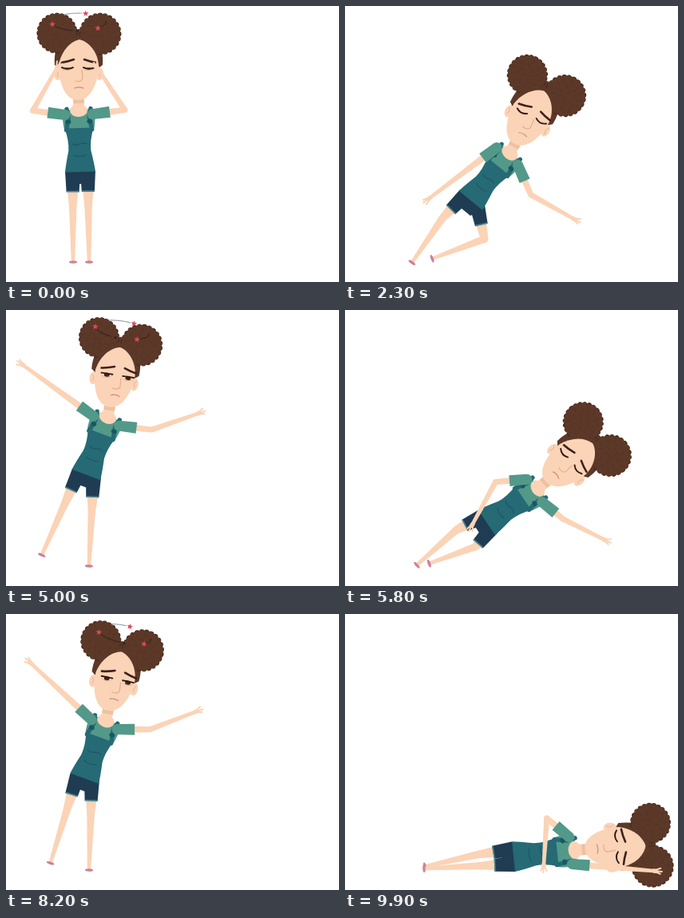
These frames come from a looping animation (417 by 346 pixels, 10 s). An HTML page with a canvas:

```html
<!DOCTYPE html>
<html lang="en">
<head>
<meta charset="utf-8">
<title>Dizzy spell</title>
<style>
html, body { margin: 0; width: 100%; height: 100%; overflow: hidden; background: #fff; }
canvas { display: block; }
</style>
</head>
<body>
<canvas id="stage" width="417" height="346"></canvas>
<script>
const ctx = document.getElementById('stage').getContext('2d');
const LOOP = 10000, CYCLE = LOOP / 3, STEP = 100, TAU = Math.PI * 2, DEG = TAU / 360;
const LANDED = 2620;
const SKIN = '#fbd3b6', SHADE = '#e3ae90', HAIR = '#5b3828', HAIR_DARK = '#4b2d20',
  SHIRT = '#52998a', DENIM = '#256a74', DENIM_DARK = '#1b5661', SHORTS = '#1f3c53',
  CUFF = '#4f8793', SHOE = '#cf7f98', STAR = '#e0485a';

// Key poses: joints in stage pixels, angles in degrees
const hold = { hip: [93, 207], lean: [-1.5], tilt: [0], handL: [63, 79], handR: [116, 80],
  footL: [84, 319], footR: [104, 319] };
const swoon = { ...hold, lean: [15], tilt: [7], handL: [93, 82], handR: [163, 72] };
const reel = { ...hold, hip: [97, 205], lean: [20], tilt: [14], handL: [40, 58], handR: [234, 118],
  footL: [64, 314] };
const teeter = { ...reel, hip: [103, 206], lean: [21], tilt: [6], handL: [12, 78], handR: [242, 138],
  footL: [34, 300] };
const tumble = { hip: [158, 243], lean: [39.5], tilt: [28], handL: [107, 240], handR: [285, 266],
  footL: [85, 320], footR: [111, 316] };
const rest = { hip: [212, 304], lean: [84], tilt: [86], handL: [249, 313], handR: [386, 322],
  footL: [102, 316], footR: [101, 319] };

const smooth = u => u * u * (3 - 2 * u);
const drop = u => u ** 1.5;
const moves = [[300, 670, swoon, smooth], [1080, 1350, reel, smooth], [1350, 1900, teeter, smooth],
  [2130, 2300, tumble, drop], [2300, LANDED, rest, drop]];

const clamp = v => Math.min(1, Math.max(0, v));
const ramp = (t, from, to) => clamp((t - from) / (to - from));
const mix = (a, b, u) => a + (b - a) * u;

const turn = ([x, y], a) => [x * Math.cos(a) - y * Math.sin(a), x * Math.sin(a) + y * Math.cos(a)];
const add = (p, q) => [p[0] + q[0], p[1] + q[1]];
const dir = (p, q) => Math.atan2(q[1] - p[1], q[0] - p[0]);
const dist = (p, q) => Math.hypot(q[0] - p[0], q[1] - p[1]);
const toward = (p, q, d) => add(p, turn([d, 0], dir(p, q)));

function poseAt(t) {
  let pose = hold;
  for (const [from, to, next, ease] of moves) {
    const u = ease(ramp(t, from, to)), blend = {};
    for (const key in next) blend[key] = next[key].map((v, i) => mix(pose[key][i], v, u));
    pose = blend;
  }
  // Sway on the feet, then settle after landing
  const sway = t < 1333 ? -6 * Math.sin(t / 1333 * TAU) : 0;
  const after = Math.max(0, t - LANDED);
  const wobble = 6 * Math.exp(-after / 90) * Math.sin(after / 45);
  pose.lean = (pose.lean[0] + sway * .75 + wobble) * DEG;
  pose.tilt = (pose.tilt[0] + sway * .3 + wobble) * DEG;
  for (const hand of [pose.handL, pose.handR]) hand[0] += sway;
  return pose;
}

// Middle joint of a two-bone limb; side sets how far and which way it bends
function joint(p, q, upper, lower, side) {
  const d = dist(p, q), along = (upper * upper - lower * lower + d * d) / (2 * d);
  const out = Math.sqrt(Math.max(0, upper * upper - along * along));
  return add(p, turn([along, -out * side], dir(p, q)));
}

function shape(d, fill, stroke, width = 1) {
  const path = new Path2D(d);
  if (fill) { ctx.fillStyle = fill; ctx.fill(path); }
  if (stroke) { ctx.strokeStyle = stroke; ctx.lineWidth = width; ctx.stroke(path); }
}

function oval(x, y, rx, ry, fill) {
  ctx.fillStyle = fill;
  ctx.beginPath();
  ctx.ellipse(x, y, rx, ry, 0, 0, TAU);
  ctx.fill();
}

function limb(p, q, w1, w2, fill, roundEnd = true) {
  const a = dir(p, q);
  const pts = [add(p, turn([0, -w1 / 2], a)), add(q, turn([0, -w2 / 2], a)),
    add(q, turn([0, w2 / 2], a)), add(p, turn([0, w1 / 2], a))];
  shape('M' + pts.join('L') + 'Z', fill);
  if (roundEnd) oval(...q, w2 / 2, w2 / 2, fill);
}

function at([x, y], a, draw) {
  ctx.save();
  ctx.translate(x, y);
  ctx.rotate(a);
  draw();
  ctx.restore();
}

function leg(hip, knee, foot) {
  const hem = toward(hip, knee, 26);
  limb(hem, knee, 13, 9.5, SKIN);
  limb(knee, foot, 9.5, 4.5, SKIN);
  at(foot, dir(knee, foot) - TAU / 4, () => oval(0, 2, 5, 1.7, SHOE));
}

function shortLeg(hip, knee) {
  const hem = toward(hip, knee, 26);
  limb(hip, hem, 19, 16, SHORTS, false);
  limb(toward(hip, knee, 24.5), hem, 16, 16, CUFF, false);
}

function torso(h) {
  shape('M-8,0L-19,3Q-22,12 -18,28H18Q22,12 19,3L8,0Z', SHIRT);
  oval(0, 2, 11, 8, SKIN);
  shape(`M-18,24H18Q13,40 14,52Q18,${h - 8} 19,${h + 1}H-19Q-18,${h - 8} -14,52Q-13,40 -18,24Z`, DENIM);
  for (const s of [-1, 1]) {
    shape(`M${s * 15},0L${s * 13},10L${s * 16},26`, null, DENIM, 5.5);
    oval(s * 13.5, 16, 3.5, 2.6, DENIM_DARK);
  }
  shape('M-9,44Q-4,46 0,44T9,44M-8,58Q0,61 8,58', null, DENIM_DARK);
}

function bun(x, y, r) {
  for (let i = 0; i < 24; i++) {
    const [dx, dy] = turn([r - 3, 0], i / 24 * TAU);
    oval(x + dx, y + dy, 3.6, 3.6, i % 2 ? HAIR : HAIR_DARK);
  }
  oval(x, y, r - 1, r - 1, HAIR);
  ctx.globalAlpha = .25;
  ctx.strokeStyle = HAIR_DARK;
  ctx.lineWidth = 1;
  for (let i = 0; i < 22; i++) {
    const a = i * 2.4, [dx, dy] = turn([Math.sqrt(i / 22) * (r - 4), 0], a);
    ctx.beginPath();
    ctx.arc(x + dx, y + dy, 2.8, a, a + 2.6);
    ctx.stroke();
  }
  ctx.globalAlpha = 1;
}

function eye(x, y, open) {
  at([x, y], 0, () => {
    if (open > .1) {
      shape(`M-7,-1H7Q0,${9 * open} -7,-1Z`, '#fff');
      oval(0, .5, 3.6, 3.2 * open, '#4a2417');
      shape(`M-6,2Q0,${2 + 5 * open} 6,1`, null, SHADE, .8);
    }
    shape(`M-7,-1Q0,${4 - 6 * open} 7,-1`, null, '#2e1a15', 1.9);
  });
}

function star(x, y) {
  const pts = Array.from({ length: 10 }, (_, i) => add([x, y], turn([0, i % 2 ? -1.7 : -4], i * TAU / 10)));
  shape('M' + pts.join('L') + 'Z', STAR);
}

// Stars circling the head; only the near or far half is drawn
function halo(t, near) {
  const spot = a => [34 * Math.cos(a), -60 + 11 * Math.sin(a)];
  const visible = a => Math.sin(a) > 0 === near;
  for (let i = 0; i < 3; i++) {
    const a = (45 + 120 * i - .787 * t) * DEG;
    for (let k = 8; k < 62; k += 6) {
      const b = a - k * DEG;
      if (visible(b)) shape(`M${spot(b)}L${spot(b - 6 * DEG)}`, null, near ? '#34221f' : '#8f989c', .9);
    }
    const dot = a - 72 * DEG;
    if (visible(dot)) oval(...spot(dot), 1.5, 1.5, '#2b2326');
    if (visible(a)) star(...spot(a));
  }
}

function features(open) {
  shape('M-22,-9Q-14,-10 -6,-13M7,-13Q15,-10 22,-9', null, '#3d211a', 2.6);
  eye(-14, -2, open);
  eye(13, -2, open);
  shape('M4,0L5,11Q2,16 -4,14', null, SHADE, 1.2);
  shape('M-5,23Q0,20.5 6,23', null, '#c88f7c', 1.2);
}

function head(t) {
  const dizzy = t < 2150;
  const blink = clamp(1.7 - Math.abs(t - 690) / 100);
  const open = dizzy ? Math.min(.85, .35 + t / 60) * (1 - blink) : 0;
  const look = 4 * ramp(t, 1080, 1350) * (1 - ramp(t, 2130, LANDED));
  if (dizzy) halo(t, false);
  shape('M-30,-6C-32,-30 -20,-49 0,-51C20,-49 32,-30 30,-6L22,0H-22Z', HAIR);
  bun(-27, -46, 25);
  bun(27, -45, 26);
  for (const s of [-1, 1]) {
    oval(s * 26, 5, 5, 8, SKIN);
    shape(`M${s * 28},1Q${s * 24},4 ${s * 27},9`, null, SHADE, .8);
  }
  shape('M1,-38C-12,-35 -22,-22 -25,-6C-25,14 -18,38 -1,38C16,38 25,14 25,-6C24,-21 14,-35 1,-38Z', SKIN);
  at([look, 0], 0, () => features(open));
  if (dizzy) halo(t, true);
}

function arm(shoulder, wrist, side) {
  const elbow = joint(shoulder, wrist, 41, 60, side);
  limb(shoulder, elbow, 9, 7, SKIN);
  limb(elbow, wrist, 7, 4.5, SKIN);
  at(wrist, dir(elbow, wrist), () => {
    oval(2, 0, 4, 2.8, SKIN);
    shape('M2,-1L9,-4M3,0L11,0M2,1L9,3', null, SKIN, 2);
  });
  limb(shoulder, toward(shoulder, elbow, 22), 13, 14, SHIRT, false);
  oval(...shoulder, 6.5, 6.5, SHIRT);
}

function draw(t) {
  ctx.fillStyle = '#fff';
  ctx.fillRect(0, 0, 417, 346);
  ctx.lineCap = ctx.lineJoin = 'round';

  const { hip, lean, tilt, handL, handR, footL, footR } = poseAt(t);
  const neck = add(hip, turn([0, -78], lean)), face = add(neck, turn([0, -49], tilt));
  const pair = (p, x, y) => [-x, x].map(dx => add(p, turn([dx, y], lean)));
  const hips = pair(hip, 9.5, 0), shoulders = pair(neck, 17, 7);
  const buckle = ramp(t, 2130, 2300), fold = ramp(t, 2300, 2450);
  const feet = [footL, footR];
  const knees = feet.map((f, i) => joint(hips[i], f, 44, 68, buckle * (i ? 1 - fold * .7 : -.25)));

  feet.forEach((f, i) => leg(hips[i], knees[i], f));
  hips.forEach((h, i) => shortLeg(h, knees[i]));
  at(hip, lean, () => shape('M-18,-2H18L12,16H-12Z', SHORTS));
  at(neck, lean, () => torso(78));
  limb(add(neck, turn([0, 3], lean)), toward(neck, face, 20), 14, 14, SKIN);
  limb(toward(neck, face, 7), toward(neck, face, 12), 13, 14, '#efc0a2', false);
  at(face, tilt, () => head(t));
  arm(shoulders[0], handL, mix(1, -.9, fold));
  arm(shoulders[1], handR, mix(-1, -.2, fold));
}

function tick() {
  const now = Math.floor(performance.now() / STEP) * STEP % LOOP;
  draw(now % CYCLE);
  requestAnimationFrame(tick);
}
tick();
</script>
</body>
</html>
```
